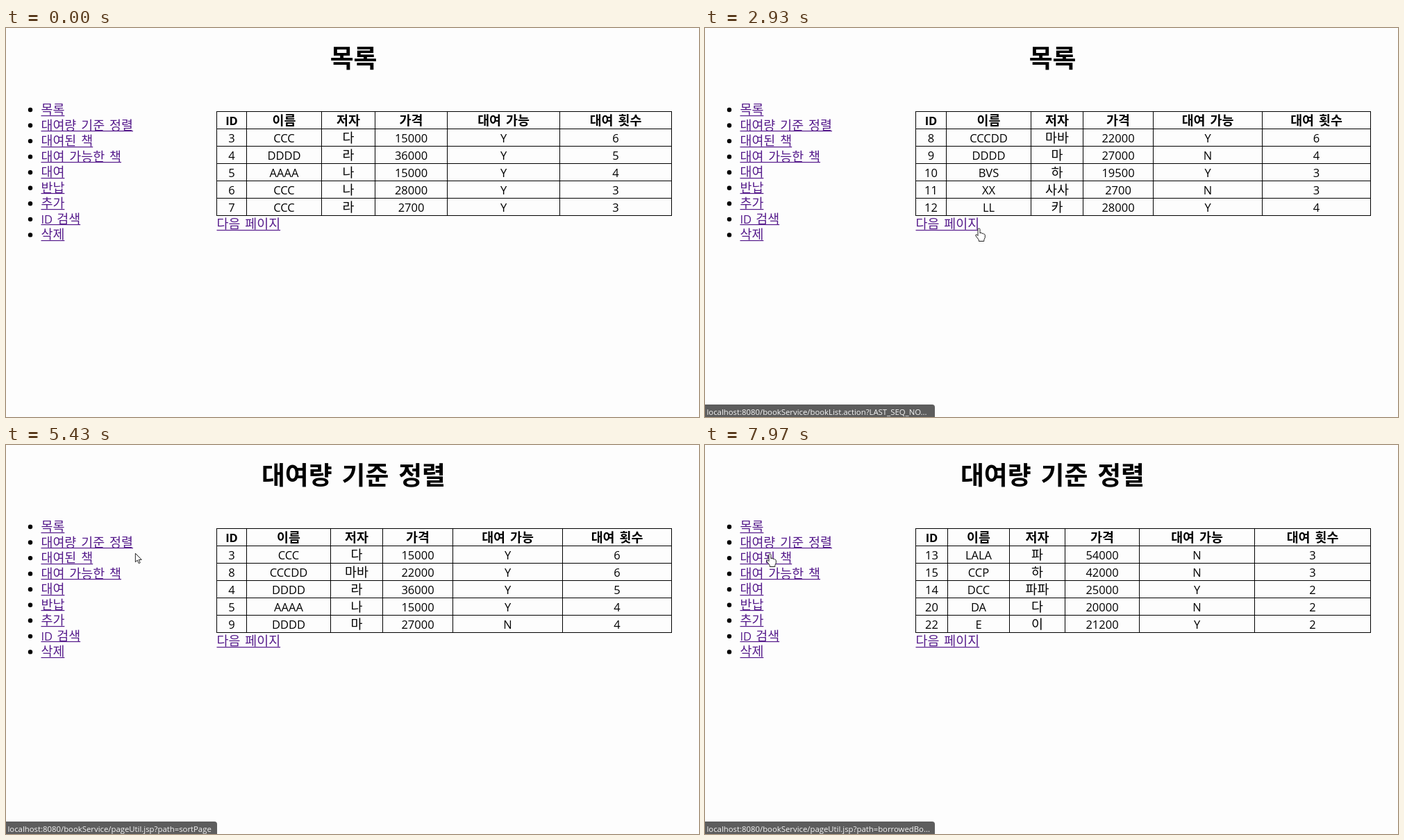
Recreate the animation shown at these times as an HTML page. Size 998 by 561 pixels, loop 8 s.

```html
<!DOCTYPE html>
<html lang="ko">
<head>
<meta charset="utf-8">
<title>목록</title>
<style>
html, body { margin: 0; width: 100%; height: 100%; overflow: hidden; background: #fdfdfd; }
svg { display: block; width: 998px; height: 561px; }
text { font: 350 18.4px "Noto Sans CJK KR", "Noto Sans KR", "Noto Sans CJK", sans-serif; word-spacing: .1em; }
.latin { font-family: "Open Sans", "Noto Sans", sans-serif; font-size: 16.5px; font-weight: 400; }
.mid { text-anchor: middle; }
.head, .head .latin { font-weight: 700; }
#title { font-size: 36.8px; font-weight: 700; }
.link { fill: #551a8b; }
#status text { font: 11.35px "Open Sans", "Noto Sans", sans-serif; fill: #f4f4f4; word-spacing: 0; }
#cursor path { fill: #fff; stroke: #222; stroke-width: 1; stroke-linejoin: round; }
</style>
</head>
<body>
<svg viewBox="0 0 998 561">
  <text id="title" class="mid" x="500.5" y="56.5"></text>
  <g id="menu"></g>
  <g id="table"></g>
  <g id="status"><path fill="#5d5d5d"/><text x="2.5" y="557.5"></text></g>
  <g id="cursor">
    <path id="arrow" d="M0 0V12.6l2.9-2.7 2 4.6 2-.9-2-4.4h4z"/>
    <path id="hand" d="M-2 1.5a1.5 1.5 0 0 1 3 0V7l1-.8 1.5.4.6.9 1.2-.4 1 .9 1.3.3.7 1.4v3.5l-1.5 3.2v2.1h-7.5v-2l-4.3-5.6c-1-1.6.8-2.6 2-1.5l1 1.2z"/>
  </g>
</svg>
<script>
const LOOP = 8000;
const $ = id => document.getElementById(id);

const MENU = ['목록', '대여량 기준 정렬', '대여된 책', '대여 가능한 책', '대여', '반납', '추가', 'ID 검색', '삭제'];
const HEAD = ['ID', '이름', '저자', '가격', '대여 가능', '대여 횟수'];

// name, author, price, available, times lent; first entry has ID 3
const BOOKS = `CCC 다 15000 Y 6
DDDD 라 36000 Y 5
AAAA 나 15000 Y 4
CCC 나 28000 Y 3
CCC 라 2700 Y 3
CCCDD 마바 22000 Y 6
DDDD 마 27000 N 4
BVS 하 19500 Y 3
XX 사사 2700 N 3
LL 카 28000 Y 4
LALA 파 54000 N 3
DCC 파파 25000 Y 2
CCP 하 42000 N 3
B 타 18000 Y 1
C 자 24000 Y 1
F 아 10200 Y 1
I 아 29000 Y 1
DA 다 20000 N 2
GA 가 36000 Y 1
E 이 21200 Y 2`.split('\n').map((line, i) => [String(i + 3), ...line.split(' ')]);

// start time, title, IDs, inner column lines
const PAGES = [
  [0, MENU[0], [3, 4, 5, 6, 7], [346, 454, 531, 635, 797]],
  [2720, MENU[0], [8, 9, 10, 11, 12], [347, 469, 544, 645, 802]],
  [3530, MENU[0], [13, 14, 15, 16, 17], [349, 438, 518, 625, 791]],
  [4200, MENU[0], [18, 19, 20, 21, 22], [350, 431, 511, 620, 789]],
  [5060, MENU[1], [3, 8, 4, 5, 9], [346, 467, 542, 643, 801]],
  [6620, MENU[1], [12, 6, 7, 10, 11], [350, 432, 513, 621, 790]],
  [7230, MENU[1], [13, 15, 14, 20, 22], [349, 438, 518, 625, 791]]
];

const HOST = 'localhost:8080/bookService/';
const NEXT = [HOST + 'bookList.action?LAST_SEQ_NO...', 331];
// start time, address, bubble width
const STATUS = [
  [0, '', 0],
  [1640, HOST + 'bookList.action', 238],
  [2200, '', 0],
  [2420, ...NEXT],
  [3900, '', 0],
  [4000, ...NEXT],
  [4840, HOST + 'pageUtil.jsp?path=sortPage', 304],
  [5700, '', 0],
  [5900, HOST + 'pageUtil.jsp?path=sortPage&L...', 331],
  [7800, HOST + 'pageUtil.jsp?path=borrowedBo...', 331]
];

// time, x, y of the pointer tip
const PATH = [
  [970, 880, 556], [1400, 330, 250], [1600, 78, 81], [1700, 66, 108], [1830, 66, 108],
  [1970, 125, 125], [2300, 300, 235], [2500, 376, 282], [2630, 388, 289], [2700, 388, 289],
  [2900, 395, 289], [3800, 395, 289], [3900, 422, 283], [4030, 385, 283], [4200, 385, 283],
  [4350, 330, 262], [4570, 211, 227], [4750, 158, 160], [4870, 143, 137], [5030, 143, 137],
  [5250, 150, 142], [5430, 186, 156], [5660, 262, 205], [5830, 318, 234], [5930, 336, 276],
  [6070, 338, 276], [6500, 349, 275], [6730, 374, 281], [7230, 374, 281], [7400, 340, 262],
  [7700, 160, 185], [7880, 83, 160], [7970, 94, 157], [8000, 94, 157]
];

const links = [];

function add(parent, tag, attrs) {
  const el = document.createElementNS('http://www.w3.org/2000/svg', tag);
  for (const key in attrs) el.setAttribute(key, attrs[key]);
  return parent.appendChild(el);
}

function write(parent, str, x, y, cls) {
  const el = add(parent, 'text', { x, y, class: cls });
  for (const run of str.match(/[ -~]*[!-~][ -~]*|[^!-~]+/g)) {
    const latin = /[!-~]/.test(run);
    add(el, 'tspan', latin ? { class: 'latin' } : {}).textContent = run;
  }
  return el;
}

function link(parent, str, x, y) {
  const width = write(parent, str, x, y, 'link').getComputedTextLength();
  add(parent, 'rect', { x, y: Math.round(y + 1.6), width, height: 1.2, class: 'link' });
  links.push({ x, y, width });
}

function drawTable([, title, ids, inner]) {
  const table = $('table');
  table.replaceChildren();
  $('title').textContent = title;
  const cols = [303, ...inner, 958];
  let d = '';
  for (const x of cols) d += `M${x + .5} 120V271`;
  for (let y = 120.5; y < 271; y += 25) d += `M303 ${y}H959`;
  add(table, 'path', { d, stroke: '#000' });
  [HEAD, ...ids.map(id => BOOKS[id - 3])].forEach((row, r) =>
    row.forEach((cell, c) =>
      write(table, cell, (cols[c] + cols[c + 1] + 1) / 2, 140 + 25 * r, r ? 'mid' : 'mid head')));
}

function drawStatus([, address, width]) {
  const [bubble, label] = $('status').children;
  bubble.setAttribute('d', width ? `M0 543H${width - 4}q4 0 4 4V561H0z` : '');
  label.textContent = address;
}

function pointerAt(t) {
  const i = PATH.findIndex(key => key[0] > t);
  if (i < 1) return null;
  const [t0, x0, y0] = PATH[i - 1], [t1, x1, y1] = PATH[i];
  const k = (t - t0) / (t1 - t0);
  return [x0 + (x1 - x0) * k, y0 + (y1 - y0) * k];
}

function drawCursor(t) {
  const pos = pointerAt(t);
  $('cursor').style.display = pos ? '' : 'none';
  if (!pos) return;
  const [x, y] = pos;
  const over = links.some(l => x >= l.x && x <= l.x + l.width + 2 && y > l.y - 18 && y < l.y + 5);
  $('cursor').setAttribute('transform', `translate(${x} ${y})`);
  $('hand').style.display = over ? '' : 'none';
  $('arrow').style.display = over ? 'none' : '';
}

const current = (list, t) => list.findLast(item => item[0] <= t);
let page, status;

function frame(now) {
  const t = (now - start + LOOP) % LOOP;
  const nextPage = current(PAGES, t), nextStatus = current(STATUS, t);
  if (nextPage !== page) drawTable(page = nextPage);
  if (nextStatus !== status) drawStatus(status = nextStatus);
  drawCursor(t);
  requestAnimationFrame(frame);
}

MENU.forEach((label, i) => {
  const y = 124 + 22.55 * i;
  add($('menu'), 'circle', { cx: 35, cy: y - 6, r: 3.2 });
  link($('menu'), label, 50.5, y);
});
link($('menu'), '다음 페이지', 303.5, 289);

const start = performance.now();
frame(start);
</script>
</body>
</html>
```
